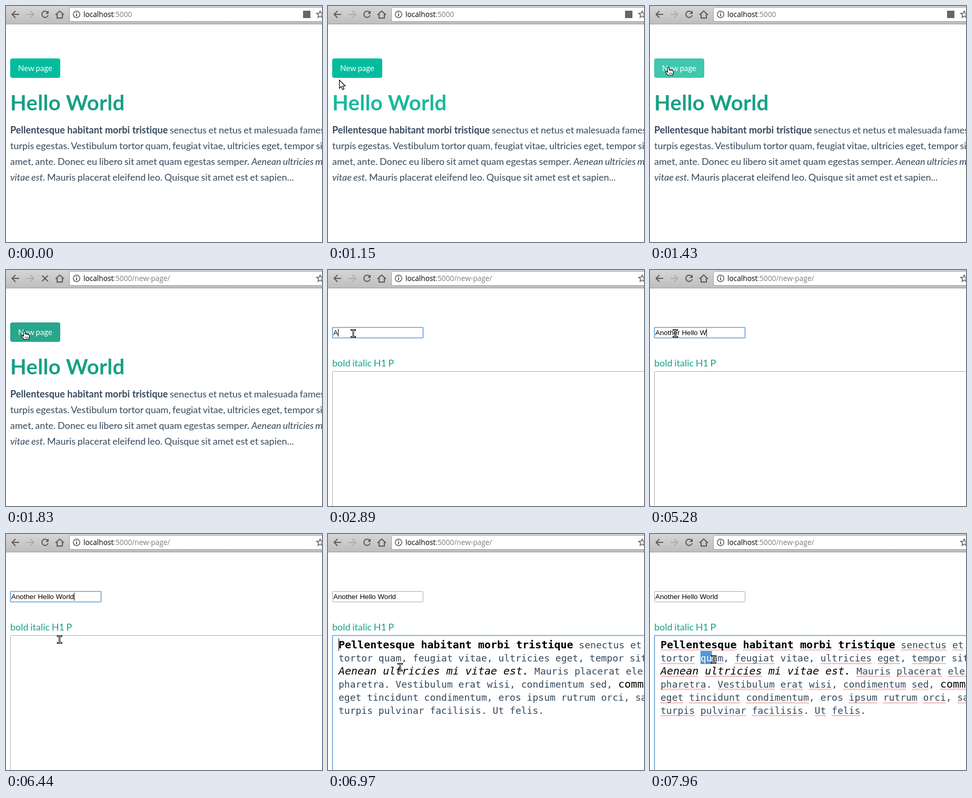
An HTML page for the animation above (8 s loop, 600 by 450 pixels).

```html
<!DOCTYPE html>
<html lang="en">
<head>
<meta charset="utf-8">
<title>New page</title>
<style>
  html, body { margin: 0; width: 100%; height: 100%; overflow: hidden; background: #fff; }
  svg { display: block; }
  text { white-space: pre; }
  .lato { font: 18px Lato, sans-serif; font-variant-ligatures: none; word-spacing: -1px; fill: #34495e; }
  .lato .bold { word-spacing: 0; letter-spacing: .07px; }
  .url { font: 13.7px "Open Sans", sans-serif; fill: #7c7c7c; }
  .field { font: 13.333px "Liberation Sans", Arial, sans-serif; }
  .mono { font: 18px "DejaVu Sans Mono", monospace; fill: #34495e; }
  .big { font-size: 20px; fill: #000; }
  .bold { font-weight: 700; }
  .italic { font-style: italic; }
  .icon { fill: none; stroke: #5a5a5a; stroke-width: 2; }
  #heading { font-size: 40px; font-weight: 700; word-spacing: 0; letter-spacing: .33px; }
</style>
</head>
<body>
<svg width="600" height="450" viewBox="0 0 600 450">
  <defs>
    <linearGradient id="bar" x2="0" y2="1">
      <stop stop-color="#d5d5d5"/><stop offset="1" stop-color="#bebebe"/>
    </linearGradient>
    <pattern id="wave" width="4" height="3" patternUnits="userSpaceOnUse">
      <path d="M-1 3L2 .5L5 3" fill="none" stroke="#e0524a" stroke-opacity=".85"/>
    </pattern>
  </defs>

  <rect width="600" height="34" fill="url(#bar)"/>
  <path d="M0 34.5H600" stroke="#989898"/>
  <rect x="120.5" y="2.5" width="500" height="27" rx="3" fill="#fff" stroke="#9c9c9c"/>
  <g class="icon">
    <path d="M25 16H12M18 9.5L11.5 16L18 22.5"/>
    <path d="M39 16H52M46 9.5L52.5 16L46 22.5" stroke="#acacac"/>
    <g id="reload">
      <path d="M79 12.2A6 6 0 1 0 80 17.5"/>
      <path d="M81 9V15H75Z" fill="#5a5a5a" stroke="none"/>
    </g>
    <path id="stop" d="M68.5 10.5L79.5 21.5M79.5 10.5L68.5 21.5"/>
    <path d="M94 17L102 9.5L110 17M97 15.5V23H107V15.5"/>
    <circle cx="134" cy="16" r="6.2" stroke-width="1.5"/>
    <path d="M134 15V19.5M134 12V13.8"/>
    <path d="M596.5 9.5L598.4 14H603L599.5 17.2L600.6 22L596.5 19.4L592.4 22L593.5 17.2L589.8 14H594.6Z" stroke-width="1.4"/>
  </g>
  <rect id="badge" x="564" y="9" width="14" height="14" fill="#666"/>
  <text class="url" x="147" y="21"><tspan fill="#000">localhost</tspan>:5000<tspan id="path">/new-page/</tspan></text>

  <g id="home" class="lato">
    <rect id="button" x="8" y="100" width="95" height="37" rx="4"/>
    <text x="23" y="124" font-size="15" fill="#fff">New page</text>
    <text id="heading" x="8" y="199">Hello World</text>
    <text x="8" y="243"><tspan class="bold">Pellentesque habitant morbi tristique</tspan> senectus et netus et malesuada fames ac</text>
    <text x="8" y="273">turpis egestas. Vestibulum tortor quam, feugiat vitae, ultricies eget, tempor sit</text>
    <text x="8" y="303">amet, ante. Donec eu libero sit amet quam egestas semper. <tspan class="italic">Aenean ultricies mi</tspan></text>
    <text x="8" y="333"><tspan class="italic">vitae est.</tspan> Mauris placerat eleifend leo. Quisque sit amet est et sapien...</text>
  </g>

  <g id="form">
    <rect id="input" x="8.5" y="109.5" width="172" height="20" rx="1" fill="none"/>
    <text id="title" class="field" x="10" y="124"></text>
    <text class="lato" x="8" y="184" style="fill:#16a085">bold italic H1 P</text>
    <rect id="editor" x="8.5" y="193.5" width="640" height="300" rx="1" fill="none"/>
    <rect id="selection" x="95.9" y="223" height="25" fill="#4f97e0"/>
    <g id="content" class="mono"></g>
    <g id="waves" fill="url(#wave)"></g>
    <rect id="caret" width="1"/>
  </g>

  <g id="arrow"><path d="M.5.5V16L4 12.7L6.6 18.6L9.3 17.4L6.8 11.7H11.6Z" fill="#fff" stroke="#000" stroke-width="1.2"/></g>
  <g id="hand"><path d="M-1.6 8V.8C-1.6-1.2 1.4-1.2 1.4.8V5C3 4.8 4.2 4.8 4.5 5.6C6 4.8 7 5.4 7.2 6.4C8.6 6 9.4 6.8 9.4 8V11L7.8 15H-1.2L-5.2 9.5C-5.4 7.6-3.6 7-2.6 8.2L-1.6 9.4Z" fill="#fff" stroke="#000" stroke-width="1.2"/><path d="M1.8 10V13M4 10V13M6.2 10V13" stroke="#000" stroke-width=".8"/></g>
  <g id="beam" fill="none"></g>
</svg>
<script>
const LOOP = 8000, CHAR = 0.60205;
const $ = id => document.getElementById(id);
const show = (id, on) => $(id).style.display = on ? '' : 'none';
const set = (id, attrs) => { for (const k in attrs) $(id).setAttribute(k, attrs[k]); };

// Linear interpolation through keys of the form [time, ...values]
function track(t, keys) {
  const i = keys.findIndex(k => k[0] > t);
  if (i < 0) return keys.at(-1).slice(1);
  if (i === 0) return keys[0].slice(1);
  const a = keys[i - 1], b = keys[i], p = (t - a[0]) / (b[0] - a[0]);
  return a.slice(1).map((v, j) => v + (b[j + 1] - v) * p);
}
const rgb = (t, keys) => `rgb(${track(t, keys).map(Math.round)})`;

const ibeam = 'M-3.5-6.5H-1.5Q0-6.5 0-5V5Q0 6.5-1.5 6.5H-3.5M3.5-6.5H1.5Q0-6.5 0-5M0 5Q0 6.5 1.5 6.5H3.5';
$('beam').innerHTML = `<path d="${ibeam}" stroke="#000" stroke-width="3" stroke-linecap="square"/><path d="${ibeam}" stroke="#fff"/>`;

// Editor lines as [text, style] runs
const lines = [
  [['Pellentesque habitant morbi tristique', 'big bold'], [' senectus et netus']],
  [['tortor quam, feugiat vitae, ultricies eget, tempor sit amet']],
  [['Aenean ultricies mi vitae est.', 'big italic'], [' Mauris placerat eleifend']],
  [['pharetra. Vestibulum erat wisi, condimentum sed, '], ['commodo', 'big']],
  [['eget tincidunt condimentum, eros ipsum rutrum orci, sagittis']],
  [['turpis pulvinar facilisis. Ut felis.']]
];
const known = ['sit', 'mi', 'vitae', 'est', 'eros'];
let content = '', waves = '';
lines.forEach((runs, row) => {
  const y = 218 + row * 25;
  let x = 20;
  content += `<text x="20" y="${y}">`;
  for (const [text, style = ''] of runs) {
    const step = CHAR * (style ? 20 : 18);
    for (const m of text.matchAll(/\w+/g))
      if (!known.includes(m[0]))
        waves += `<rect x="${x + m.index * step}" y="${y + 2}" width="${m[0].length * step}" height="3"/>`;
    content += `<tspan class="${style}">${text.replace('qu', row === 1 ? '<tspan id="q">q</tspan><tspan id="u">u</tspan>' : 'qu')}</tspan>`;
    x += text.length * step;
  }
  content += '</text>';
});
$('content').innerHTML = content;
$('waves').innerHTML = waves;

const title = 'Another Hello World';
const keyTimes = [2890, 3200, 3310, 3420, 3580, 3650, 3710, 3780, 4090, 4490, 4530, 4670,
  4930, 5060, 5280, 5460, 5550, 5730, 5770];

const pointer = [[790, 543, 322], [1150, 21, 141], [1280, 35, 117], [2120, 35, 117], [2260, 48, 121],
  [6260, 48, 121], [6560, 137, 254], [6990, 137, 254], [7640, 97, 241], [7820, 97, 241], [7960, 121, 239]];
const headingColor = [[950, 22, 160, 133], [1110, 26, 184, 156], [1160, 26, 184, 156], [1400, 22, 160, 133]];
const buttonColor = [[1220, 3, 188, 158], [1460, 72, 201, 176], [1720, 72, 201, 176], [1800, 41, 166, 140]];

function border(id, focused) {
  set(id, { stroke: focused ? '#5b9dd9' : '#a9a9a9', 'stroke-width': focused ? 1.6 : 1 });
}

function render(t) {
  const onForm = t >= 1870, loading = t >= 1790 && !onForm;
  show('home', !onForm);
  show('form', onForm);
  show('path', t >= 1790);
  show('badge', t < 1790);
  show('stop', loading);
  show('reload', !loading);
  $('heading').style.fill = rgb(t, headingColor);
  $('button').style.fill = rgb(t, buttonColor);

  const [x, y] = track(t, pointer);
  const overEditor = y > 194, overInput = y < 131;
  const kind = t < 790 ? '' : t < 1200 ? 'arrow' : t < 2140 ? 'hand'
    : overEditor || overInput ? 'beam' : 'arrow';
  for (const id of ['arrow', 'hand', 'beam']) {
    show(id, id === kind);
    set(id, { transform: `translate(${x} ${y})` });
  }
  if (!onForm) return;

  const inEditor = t >= 6520, inInput = t >= 2440 && !inEditor;
  border('input', inInput);
  border('editor', inEditor);
  const typed = keyTimes.filter(k => k <= t).length;
  $('title').textContent = typed ? title.slice(0, typed) : 'Enter page title';
  set('title', { fill: typed ? '#000' : '#a9a9a9' });

  show('content', inEditor);
  show('waves', t >= 7090);
  const selected = t < 7820 ? 0 : Math.max(0, Math.min(2, Math.round((x - 96) / (CHAR * 18))));
  set('selection', { width: selected * CHAR * 18 });
  $('q').style.fill = selected > 0 ? '#fff' : '';
  $('u').style.fill = selected > 1 ? '#fff' : '';

  show('caret', (inInput || inEditor) && !selected);
  if (inInput) {
    const width = typed ? $('title').getComputedTextLength() : 0;
    set('caret', { x: Math.round(10 + width), y: 112, height: 15 });
  } else {
    const placed = t >= 7640;
    set('caret', { x: placed ? 96 : 20, y: placed ? 225 : 199, height: placed ? 22 : 24 });
  }
}

function tick() {
  render(performance.now() % LOOP);
  requestAnimationFrame(tick);
}
tick();
</script>
</body>
</html>
```
